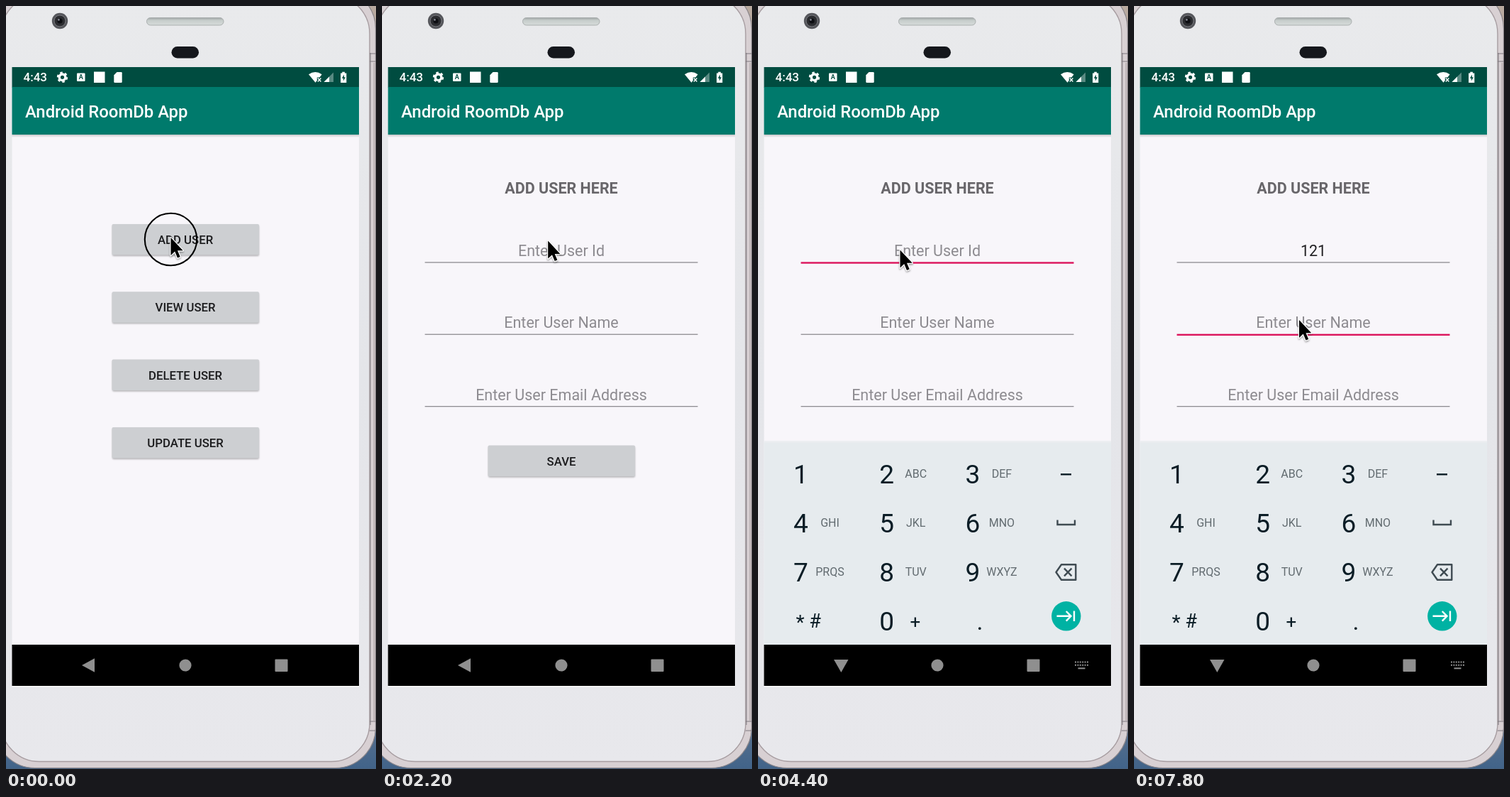
Animation of 522x1074 px, one loop 8 s. Source, as an HTML page:

```html
<!DOCTYPE html>
<html lang="en">
<head>
<meta charset="utf-8">
<title>User form demo</title>
<style>
html, body { margin: 0; width: 100%; height: 100%; overflow: hidden; background: #e6e7ea; }
svg { display: block; width: 100vw; height: 100vh; font-family: Roboto, "Noto Sans", sans-serif; }
</style>
</head>
<body>
<svg id="stage" viewBox="0 0 522 1074" preserveAspectRatio="none">
  <defs>
    <linearGradient id="desk" x1="0" y1="0" x2="0" y2="1">
      <stop offset="0" stop-color="#b9aaa0"/><stop offset=".3" stop-color="#a19a9c"/>
      <stop offset=".9" stop-color="#6c7c92"/><stop offset="1" stop-color="#416389"/>
    </linearGradient>
    <linearGradient id="shell" x1="0" y1="0" x2="0" y2="1">
      <stop offset="0" stop-color="#e9eaec"/><stop offset=".5" stop-color="#e4e5e9"/>
      <stop offset="1" stop-color="#e8e8ec"/>
    </linearGradient>
    <linearGradient id="grille" x1="0" y1="0" x2="0" y2="1">
      <stop offset="0" stop-color="#9fa5a5"/><stop offset=".35" stop-color="#c6cdcb"/>
      <stop offset="1" stop-color="#d6dbda"/>
    </linearGradient>
    <linearGradient id="fade" x1="0" y1="0" x2="0" y2="1">
      <stop offset="0" stop-color="#000" stop-opacity=".2"/><stop offset="1" stop-color="#000" stop-opacity="0"/>
    </linearGradient>
    <filter id="soft" x="-20%" y="-50%" width="140%" height="200%"><feGaussianBlur stdDeviation="1.3"/></filter>
    <filter id="drop" x="-50%" y="-50%" width="200%" height="200%">
      <feDropShadow dx="0" dy="1.5" stdDeviation="1.3" flood-opacity=".4"/>
    </filter>
  </defs>

  <!-- phone -->
  <rect width="522" height="1074" fill="url(#desk)"/>
  <rect x="-16" y="-25" width="537.500" height="1097.500" rx="57" fill="#d8d0d3" stroke="#8b868b" stroke-width="1.200"/>
  <rect x="-7" y="-15" width="520" height="1078.500" rx="54" fill="url(#shell)" stroke="#a79da1" stroke-width="1.400"/>
  <path d="M514 66V1012" stroke="#8a868b" stroke-width="1.300"/>
  <path d="M519.500 80V1006" stroke="#c2b9bc" stroke-width="3"/>
  <path d="M513 67h9M513 78h9M513 1007h9M513 1020h8" stroke="#807b80" stroke-width="1.200"/>
  <path d="M0 1073.500H522" stroke="#49627f"/>
  <circle cx="76" cy="21" r="11.200" fill="#56575c"/>
  <circle cx="76" cy="21" r="8" fill="#2b2c30" stroke="#77787d"/>
  <circle cx="76" cy="21" r="3.600" fill="#0d0e12"/>
  <circle cx="74.400" cy="19.400" r="1.300" fill="#8a8d99"/>
  <rect x="198.500" y="16.500" width="108.500" height="10.500" rx="5.200" fill="url(#grille)" stroke="#a9aeae"/>
  <rect x="233.500" y="57" width="38.500" height="16.500" rx="8.200" fill="#15171c"/>

  <!-- screen -->
  <rect x="8.500" y="957" width="489.500" height="1.500" fill="#fff"/>
  <rect x="8.500" y="86" width="489.500" height="813" fill="#f8f6fa"/>
  <rect x="8.500" y="181" width="489.500" height="4" fill="url(#fade)"/>
  <rect x="8.500" y="86" width="489.500" height="28.500" fill="#004c40"/>
  <rect x="8.500" y="114" width="489.500" height="67" fill="#007a6c"/>
  <g fill="#fff">
    <text x="24.500" y="106.300" font-size="17" font-weight="500">4:43</text>
    <text x="27" y="157.200" font-size="23.900" font-weight="500">Android RoomDb App</text>
    <circle cx="79.500" cy="100.300" r="4.300" fill="none" stroke="#fff" stroke-width="3.400"/>
    <circle cx="79.500" cy="100.300" r="6.600" fill="none" stroke="#fff" stroke-width="2.200" stroke-dasharray="3.456"/>
    <rect x="100" y="94.500" width="11.500" height="11.500" rx="1"/>
    <text x="105.800" y="103.400" font-size="9" font-weight="700" fill="#004c40" text-anchor="middle">A</text>
    <rect x="124" y="92.500" width="15.500" height="15.500"/>
    <path d="M156.500 93h6q1.200 0 1.200 1.200v12.600q0 1.200-1.200 1.200h-9q-1.200 0-1.200-1.200v-9.600z"/>
    <path d="M427 96.300q9.500-6.600 18.600 0l-3.200 4.100h-3.600v4.600l-2.300 2.700z"/>
    <path d="M439.800 101.600l4.600 4.800m0-4.800l-4.600 4.800" stroke="#fff" stroke-width="1.400"/>
    <path d="M462 93.500v13.500h-13.500z" fill-opacity=".35"/>
    <path d="M456 99.500v7.500h-7.500z"/>
    <path d="M474.300 92.800h3.600v1.600h2.400v13.600h-8.200V94.400h2.200z"/>
    <path d="M476.900 96.500l-3 5.300h2v3.700l3-5.200h-2z" fill="#004c40"/>
  </g>

  <g id="menu"></g>
  <g id="form"></g>
  <g id="pad"></g>

  <!-- navigation bar -->
  <rect x="8.500" y="899" width="489.500" height="58" fill="#000"/>
  <g fill="#8f8f8f">
    <path id="back"/>
    <circle cx="253" cy="928" r="8.600"/>
    <rect x="379.500" y="919.500" width="18" height="17.500" rx="1"/>
    <g id="keys" stroke="#8f8f8f" stroke-width="2">
      <path d="M447 923.500h19M447 927.800h19" stroke-dasharray="2 1.400"/>
      <path d="M451.500 932.300h10"/>
    </g>
  </g>

  <circle id="ring" r="36.700" fill="none" stroke="#000" stroke-width="2.100"/>
  <path id="arrow" filter="url(#drop)" d="M0 0V25L5.700 19.600L9.500 28.500L13.200 26.900L9.500 18.300H17.200Z"
    fill="#000" stroke="#fff" stroke-width="2.400" paint-order="stroke" stroke-linejoin="round"/>
</svg>
<script>
const LOOP = 8000, STEP = 100, MID = 253, PINK = '#dc145c';
const $ = id => document.getElementById(id);
const show = (el, on) => el.setAttribute('display', on ? 'inline' : 'none');
const set = (el, attrs) => { for (const k in attrs) el.setAttribute(k, attrs[k]); };

const text = (s, x, y, size, fill, weight = 400, id = '') =>
  `<text ${id && `id="${id}"`} x="${x}" y="${y}" font-size="${size}" font-weight="${weight}" fill="${fill}" text-anchor="middle">${s}</text>`;

const button = (label, y, id) => `
  <rect id="${id}Shade" x="150" y="${y + 1.5}" width="207" height="43.500" rx="2" fill="#000" opacity=".28" filter="url(#soft)"/>
  <rect id="${id}" x="149.500" y="${y}" width="207.500" height="43.500" rx="2" fill="#cdcfd2"/>
  ${text(label, MID, y + 28, 16.75, '#1b1b1d', 500)}`;

const field = (hint, y, id) =>
  text(hint, MID, y - 9, 21.5, '#8d8b90', 400, id + 'Text') +
  `<rect id="${id}Line" x="60.500" y="${y - 0.7}" width="385"/>`;

$('menu').innerHTML = ['ADD', 'VIEW', 'DELETE', 'UPDATE']
  .map((verb, i) => button(verb + ' USER', 307 + i * 95.3, 'btn' + i)).join('');

$('form').innerHTML = text('ADD USER HERE', MID, 263.8, 21.5, '#68666a', 700) +
  field('Enter User Id', 361, 'id') +
  field('Enter User Name', 462.3, 'name') +
  field('Enter User Email Address', 563.7, 'mail') +
  button('SAVE', 618.5, 'save') +
  `<rect id="caret" width="2" height="28" fill="${PINK}"/>`;

function buildPad() {
  const ink = '#0b1d26', dim = '#626b70';
  const letters = ['', 'ABC', 'DEF', 'GHI', 'JKL', 'MNO', 'PRQS', 'TUV', 'WXYZ'];
  const digits = letters.map((s, i) => {
    const x = 60.5 + (i % 3) * 121.2, y = 671.7 + Math.floor(i / 3) * 69;
    return text(i + 1, x, y, 37, ink) + text(s, x + 41, y - 7.7, 16, dim);
  }).join('');
  $('pad').innerHTML = `
    <rect x="8.500" y="612" width="489.500" height="3" fill="#eceef1"/>
    <rect x="8.500" y="614.500" width="489.500" height="284.500" fill="#e6ebee"/>${digits}
    ${text('*', 59.5, 877, 28, ink)}${text('#', 80.5, 875, 27, ink)}
    ${text(0, 181.7, 878.7, 37, ink)}${text('+', 222, 875.5, 26, ink)}${text('.', 313, 878, 34, ink)}
    <g fill="none" stroke="#3f4b52" stroke-width="2.400">
      <path d="M427 659.300H442" stroke="${ink}"/>
      <path d="M422.500 723.500V730H447V723.500"/>
      <path d="M420.500 797L428 786.300H448.300V807.800H428Z" stroke-linejoin="round"/>
      <path d="M432 791.700L442.500 802.300M442.500 791.700L432 802.300"/>
      <circle cx="434.800" cy="858.800" r="20.700" fill="#00b2a3" stroke="none"/>
      <path d="M421.500 858.800H441M434.800 852L441.500 858.800L434.800 865.600M446 851.500V866" stroke="#fff"/>
    </g>`;
}
buildPad();

// pointer path: time, x, y
const path = [
  [0, 232.5, 326], [700, 232.5, 326], [800, 246, 324.5], [1900, 246, 324.5],
  [2800, 200.5, 348], [3000, 200.5, 348], [3200, 200.5, 343.5], [4800, 200.5, 343.5],
  [5300, 342, 331], [5900, 342, 331], [6200, 420, 410], [6300, 420, 410],
  [6700, 233, 445.5], [7500, 233, 445.5], [7600, 233, 442], [LOOP, 233, 442]
];
const presses = [[0, 100], [1400, 1600], [3300, 3500], [6900, 7200]];
const caretStarts = [3600, 5300, 5500, 5600, 7300];

function pointer(t) {
  const i = path.findIndex(p => p[0] > t);
  const [t0, x0, y0] = path[i - 1], [t1, x1, y1] = path[i];
  const u = (t - t0) / (t1 - t0), k = u * u * (3 - 2 * u);
  return [x0 + (x1 - x0) * k, y0 + (y1 - y0) * k];
}

function line(id, on) {
  set($(id + 'Line'), { fill: on ? PINK : '#8e8c91', height: on ? 2.4 : 1.3 });
}

function render(t) {
  const [x, y] = pointer(t);
  set($('arrow'), { transform: `translate(${x} ${y})` });
  set($('ring'), { cx: x, cy: y + 2.5 });
  show($('ring'), presses.some(([a, b]) => t >= a && t < b));

  const inForm = t >= 1800, pressed = t >= 1600;
  show($('menu'), !inForm);
  show($('form'), inForm);
  set($('btn0'), { fill: pressed ? '#b2b1b4' : '#cdcfd2' });
  set($('btn0Shade'), { opacity: pressed ? 0.5 : 0.28 });

  const onName = t >= 7300, onId = t >= 3600 && !onName;
  line('id', onId);
  line('name', onName);
  line('mail', false);

  const typed = '121'.slice(0, t < 5300 ? 0 : t < 5500 ? 1 : t < 5600 ? 2 : 3);
  $('idText').textContent = typed || 'Enter User Id';
  set($('idText'), { fill: typed ? '#212023' : '#8d8b90' });

  const since = caretStarts.filter(s => s <= t).pop();
  show($('caret'), since !== undefined && Math.floor((t - since) / 500) % 2 === 0);
  set($('caret'), { x: onName ? 253 : 253 + typed.length * 6.05, y: onName ? 430.5 : 329.5 });

  show($('pad'), t >= 4400);
  const editing = t >= 4200;
  show($('keys'), editing);
  set($('back'), { d: editing ? 'M107 920H127.500L117.300 938Z' : 'M107 928L125 918.300V937.700Z' });
}

const start = performance.now();
function tick(now) {
  const t = Math.max(0, now - start) % LOOP;
  render(Math.floor(t / STEP) * STEP);
  requestAnimationFrame(tick);
}
render(0);
requestAnimationFrame(tick);
</script>
</body>
</html>
```
